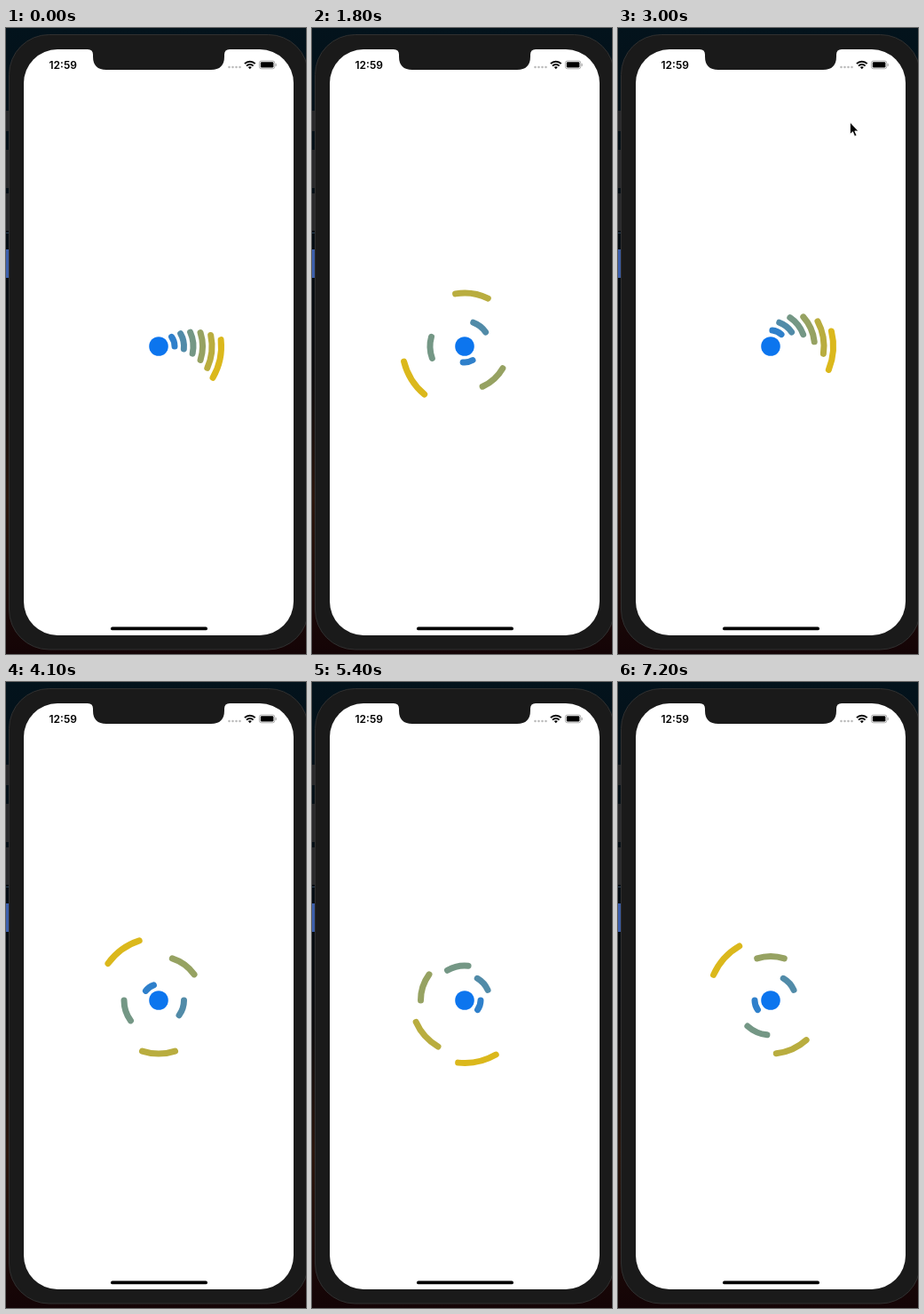
Recreate the animation shown at these times as an HTML page. Size 338x704 px, loop 7300 ms.

```html
<!DOCTYPE html>
<html lang="en">
<head>
<meta charset="utf-8">
<title>Orbit loader</title>
<style>
  html, body { margin: 0; width: 100%; height: 100%; overflow: hidden; background: #000; }
  svg { display: block; width: 100%; height: 100%; }
  text { font: 600 12px Inter, Roboto, sans-serif; }
</style>
</head>
<body>
<svg viewBox="0 0 338 704">
  <defs>
    <linearGradient id="desk" x2="0" y2="1">
      <stop offset="0" stop-color="#03131c"/>
      <stop offset=".35" stop-color="#040b12"/>
      <stop offset=".55" stop-color="#0c0b0d"/>
      <stop offset=".75" stop-color="#2a150b"/>
      <stop offset="1" stop-color="#140406"/>
    </linearGradient>
  </defs>
  <rect width="338" height="704" fill="url(#desk)"/>

  <!-- window edge behind the phone -->
  <g fill="#29292b">
    <rect y="93" width="5" height="23"/>
    <rect y="137" width="5" height="43"/>
    <rect y="186" width="5" height="42"/>
    <rect y="230" width="5" height="1" fill="#2c4257"/>
    <rect y="249" width="5" height="32" fill="#3c5fab"/>
  </g>

  <!-- phone -->
  <rect x="3.5" y="7.5" width="337" height="691.5" rx="45" fill="#1a1a1a" stroke="#303030"/>
  <rect x="20" y="24" width="304" height="659" rx="38" fill="#fff"/>
  <path fill="#1a1a1a" d="M92 23.5V24q6 0 6 6v2q0 15 15 15H231q15 0 15-15V30q0-6 6-6v-.5z"/>
  <rect x="118" y="673.5" width="109" height="3.8" rx="1.9"/>

  <!-- status bar -->
  <text x="48.5" y="45.6">12:59</text>
  <path d="M251.5 44h12.2" stroke="#bbb" stroke-width="2.6" stroke-linecap="round" stroke-dasharray="0 4"/>
  <g fill="none" stroke="#000" stroke-width="1.9">
    <path d="M268.9 40.2a8.3 8.3 0 0 1 11.8 0M271 42.6a5.4 5.4 0 0 1 7.6 0"/>
    <path d="M274.8 46.2l-2-2.1a2.9 2.9 0 0 1 4 0z" fill="#000" stroke="none"/>
  </g>
  <rect x="285.4" y="37" width="17.4" height="8.8" rx="2.4" fill="none" stroke="#999" stroke-width=".8"/>
  <rect x="286.8" y="38.2" width="14.6" height="6.4" rx="1.3"/>
  <rect x="303.6" y="40" width="1" height="3" rx=".5" fill="#999"/>

  <g id="loader" transform="translate(172 358)" fill="none" stroke-width="7" stroke-linecap="round">
    <circle r="10.8" fill="#0c75ee"/>
  </g>
  <path id="cursor" d="M0 0V13.5l3-2.8 2.1 5 2.3-1-2.1-4.8h4z" stroke="#fff" stroke-width=".8"/>
</svg>
<script>
  const LOOP = 7300, STEP = 100, COUNT = 6;
  const RADII = [18, 28.5, 39, 49.5, 60, 70.5];
  // [ms, degrees]: close to one turn in three seconds
  const TURN = [[0, 6], [199, 6], [200, 38], [1800, 230], [3000, 374], [4100, 504], [5400, 660], [6300, 770], [7200, 876]];
  // [ms, x, y]
  const POINTER = [[2400, 336, 180], [2600, 310, 150], [3000, 261.5, 106], [3200, 40, 72]];

  const mix = (a, b, k) => a.map((v, i) => v + (b[i] - v) * k);

  function at(keys, t) {
    const i = Math.max(1, keys.findIndex(k => k[0] >= t));
    const [a, b] = [keys[i - 1], keys[i]];
    return mix(a, b, (t - a[0]) / (b[0] - a[0])).slice(1);
  }

  const cursor = document.getElementById('cursor');
  const arcs = RADII.map((r, i) => {
    const arc = document.createElementNS('http://www.w3.org/2000/svg', 'path');
    const end = Math.PI / 5;
    arc.setAttribute('d', `M${r} 0A${r} ${r} 0 0 1 ${r * Math.cos(end)} ${r * Math.sin(end)}`);
    arc.setAttribute('stroke', `rgb(${mix([12, 117, 238], [219, 184, 28], (i + 1) / COUNT).map(Math.round)})`);
    document.getElementById('loader').append(arc);
    return arc;
  });

  function draw(now) {
    const t = Math.floor(now % LOOP / STEP) * STEP;
    const turn = 2 * Math.round(at(TURN, t)[0] / 2);
    // the innermost arc turns six times as fast as the outermost
    arcs.forEach((arc, i) => arc.setAttribute('transform', `rotate(${-turn * (COUNT - i)})`));

    const shown = t >= 2400 && t <= 3200;
    cursor.style.display = shown ? '' : 'none';
    if (shown) cursor.setAttribute('transform', `translate(${at(POINTER, t)})`);
  }

  const start = performance.now();
  function tick() {
    draw(performance.now() - start);
    requestAnimationFrame(tick);
  }
  tick();
</script>
</body>
</html>
```
